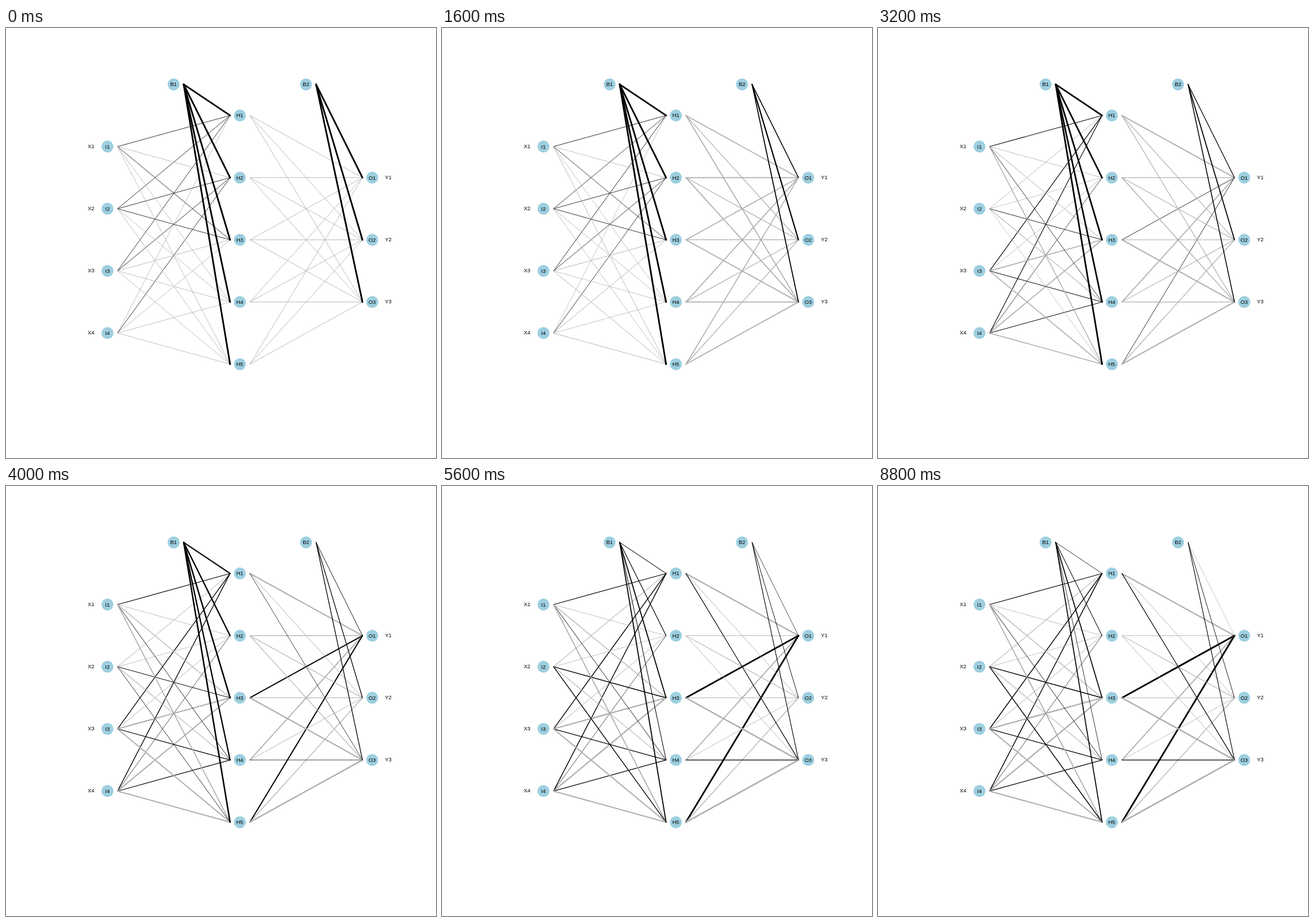
Animation of 748x748 px, one loop 9.6 s. Source, as an HTML page:

```html
<!DOCTYPE html>
<html lang="en">
<head>
<meta charset="utf-8">
<title>Network training</title>
<style>
  html, body { margin: 0; width: 100%; height: 100%; overflow: hidden; background: #fff; }
  svg { display: block; width: 100%; height: 100%; }
  line { stroke-linecap: round; }
  circle { fill: #9dcfe0; }
  text { font: 9.4px "Liberation Sans", Arial, Helvetica, sans-serif; text-anchor: middle; }
</style>
</head>
<body>
<svg viewBox="0 0 748 748"><g id="links"></g><g id="biasLinks"></g><g id="nodes"></g></svg>
<script>
const STEP_MS = 800, STEPS = 12, ROW = 108.15, TOP = 98.1, GAP = 17.5;
const POSITIVE = "#000", NEGATIVE = "#aeaeae";
const BIAS_START = 20, EARLY = 3.6, MIDDLE = 4.4, LATE = 5.6;
const links = [], nodes = {};

function add(parent, tag, attrs, text) {
  const el = document.createElementNS("http://www.w3.org/2000/svg", tag);
  for (const key in attrs) el.setAttribute(key, attrs[key]);
  if (text) el.textContent = text;
  document.getElementById(parent).append(el);
  return el;
}

const label = (x, y, text) => add("nodes", "text", { x, y: y + 3.3 }, text);

function node(name, x, row) {
  const y = TOP + row * ROW;
  nodes[name] = { x, y };
  add("nodes", "circle", { cx: x, cy: y, r: 10.4 });
  label(x, y, name);
}

function column(letter, x, count, row, outer, outerX) {
  for (let i = 1; i <= count; i++) {
    node(letter + i, x, row + i - 1);
    if (outer) label(outerX, nodes[letter + i].y - 0.6, outer + i);
  }
}

column("I", 176.5, 4, 1, "X", 148);
column("H", 406.8, 5, 0.5);
column("O", 637.1, 3, 1.5, "Y", 665);
node("B1", 291.6, 0);
node("B2", 521.9, 0);

// S-curve over the training steps, halfway at mid
const learn = (step, mid) => 1 / (1 + Math.exp(1.5 * (mid - step)));
const mix = (a, b, part) => a + (b - a) * part;

function link(from, to, weight) {
  const a = nodes[from], b = nodes[to];
  const el = add(from[0] === "B" ? "biasLinks" : "links", "line",
    { x1: a.x + GAP, y1: a.y, x2: b.x - GAP + 0.5, y2: b.y });
  links.push({ el, weight });
}

// Weights start at plus or minus one and learn their final value;
// the bias and the gains of I2 come late.
function hidden(to, signs, ends, bias) {
  ends.forEach((end, i) => {
    const start = signs[i] === "+" ? 1 : -1;
    const mid = i === 1 && end > 0 ? LATE : EARLY;
    link("I" + (i + 1), to, step => mix(start, end, learn(step, mid)));
  });
  link("B1", to, step => mix(BIAS_START, bias, learn(step, LATE)));
}

// After the first step every weight jumps to a shared level, then specialises.
function output(to, level, ends, biasLevel, bias) {
  const path = (start, middle, end) => step =>
    step < 1 ? start : mix(middle, end, learn(step, MIDDLE));
  ends.forEach((end, i) => link("H" + (i + 1), to, path(-1.5, level, end)));
  link("B2", to, path(BIAS_START, biasLevel, bias));
}

hidden("H1", "+++-", [4, -3, 7, 7], 1);
hidden("H2", "-+++", [-1, -1, -2.5, 0.1], 3);
hidden("H3", "++--", [-5, 7, -14, -14], 9);
hidden("H4", "----", [2, -4, 5, 5], 1);
hidden("H5", "----", [-10, 7, -13, -13], 9);

output("O1", -9, [-14, -2, 20, -10, 20], 8, -0.1);
output("O2", -5, [-2, -3, -2, -1, -5], 14, 2);
output("O3", -10, [5, -2, -16, 4.5, -17], 10, 4);

let shown = -1;
function draw(time) {
  const step = Math.floor(time / STEP_MS) % STEPS;
  if (step === shown) return;
  shown = step;
  for (const { el, weight } of links) {
    const w = weight(step);
    el.setAttribute("stroke", w >= 0 ? POSITIVE : NEGATIVE);
    el.setAttribute("stroke-width", (0.68 + 0.11 * Math.abs(w)).toFixed(3));
  }
}

const start = performance.now();
function tick() {
  draw(performance.now() - start);
  requestAnimationFrame(tick);
}
draw(0);
requestAnimationFrame(tick);
</script>
</body>
</html>
```
